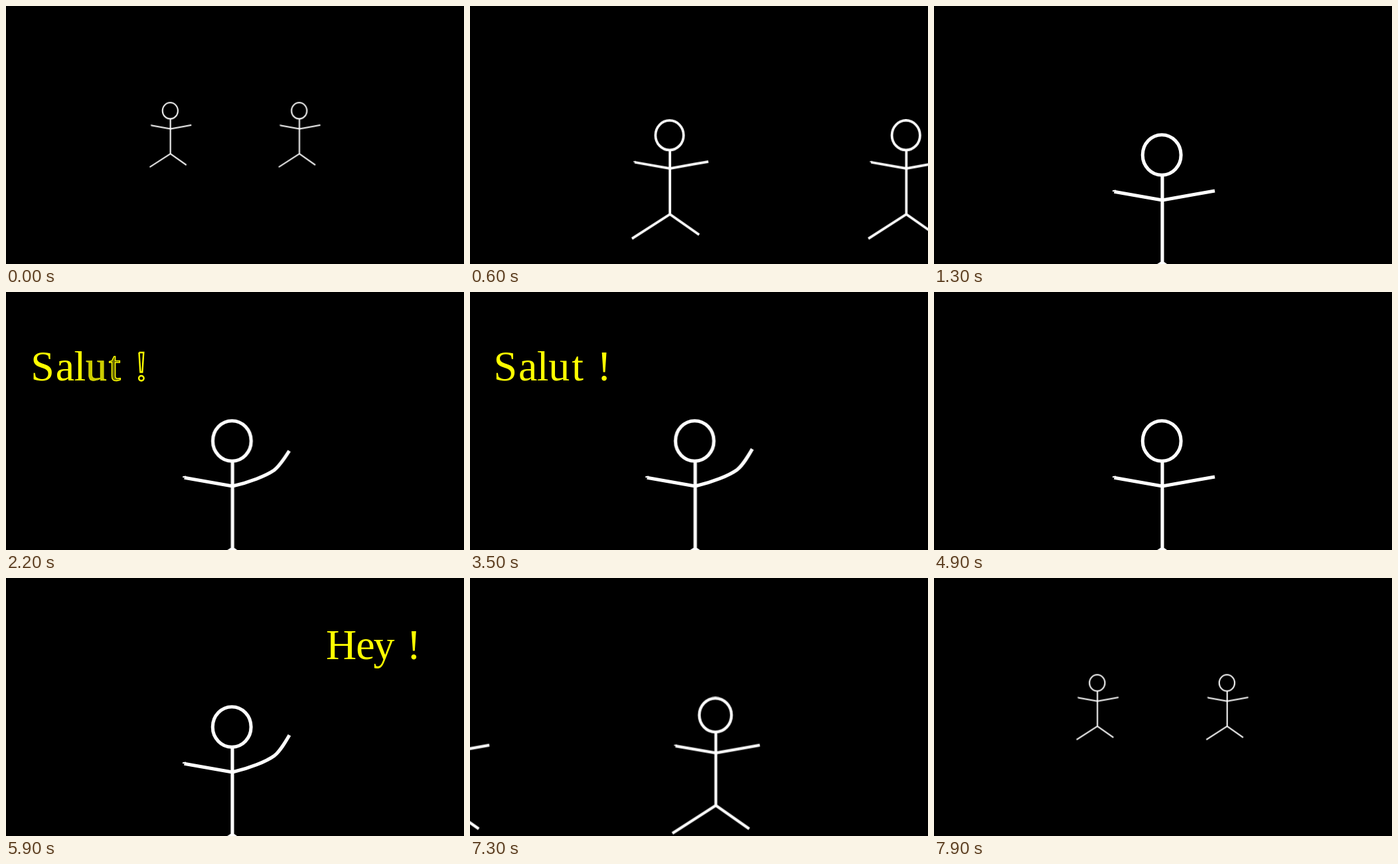
An HTML page without scripts for the animation above (8 s loop, 690 px wide and 388 px high).

```html
<!DOCTYPE html>
<html lang="fr">
<head>
<meta charset="utf-8">
<title>Two figures greeting</title>
<style>
  /* Camera: w is the view width relative to the close-up, x and y its centre */
  @property --w { syntax: "<number>"; inherits: true; initial-value: 2.5; }
  @property --x { syntax: "<number>"; inherits: true; initial-value: 587.25; }
  @property --y { syntax: "<number>"; inherits: true; initial-value: 315.25; }

  :root {
    --smooth: linear(0, .0044, .0115, .0229, .0413, .0701, .114, .1781, .2658, .3759, .5,
      .6241, .7342, .8219, .886, .9299, .9587, .9771, .9885, .9956, 1);
    --rest: path("M344 292C364 288.4 380 285.5 393 283.3C404 281.4 414 279.6 423 278");
    --raised: path("M344 292C370 286 395 276 407.5 267C416 260 423 248 430 236");
  }
  html, body { margin: 0; width: 100%; height: 100%; overflow: hidden; background: #000; }
  svg { display: block; width: 100%; height: 100%; }

  .camera, .pose, .arm, .text { animation: 8s var(--smooth) infinite both; }
  .camera {
    transform: translate(345px, 194px) scale(calc(1 / var(--w)))
      translate(calc(var(--x) * -1px), calc(var(--y) * -1px));
    animation-name: camera;
  }
  @keyframes camera {
    0%, 99.875%, 100% { --w: 2.5; --x: 587.25; --y: 315.25; }
    12.25%, 43.25% { --w: 1; --x: 345; --y: 194; }
    55.75%, 87.375% { --w: 1; --x: 830.75; --y: 194; }
  }

  .figure { fill: none; stroke: #fff; stroke-width: 5.1; }
  .arm { d: var(--rest); }
  .first .pose { animation-name: lean1; }
  .first .arm { animation-name: wave1; }
  .second .pose { animation-name: lean2; }
  .second .arm { animation-name: wave2; }
  @keyframes lean1 {
    0%, 18.125%, 55.75%, 100% { transform: translate(0, 0); }
    30.625%, 43.25% { transform: translate(-3px, 0); }
  }
  @keyframes lean2 {
    0%, 61.875%, 86.875%, 100% { transform: translate(0, 0); }
    74.375% { transform: translate(-3px, 0); }
  }
  @keyframes wave1 {
    0%, 18.125%, 55.75%, 100% { d: var(--rest); }
    30.625%, 43.25% { d: var(--raised); }
  }
  @keyframes wave2 {
    0%, 61.875%, 86.875%, 100% { d: var(--rest); }
    74.375% { d: var(--raised); }
  }

  .text {
    font: 64px "Liberation Serif", serif;
    text-anchor: middle;
    fill: #ff0;
    stroke: #ff0;
  }
  .salut { --len: 260; --start: 1.45s; --lag: .1s; animation-name: fade1; }
  .hey { --len: 420; --start: 4.95s; --lag: .14s; animation-name: fade2; }
  @keyframes fade1 {
    0%, 43.25% { opacity: 1; }
    55.75%, 100% { opacity: 0; }
  }
  @keyframes fade2 {
    0%, 30% { opacity: 0; }
    30.01%, 74.375% { opacity: 1; }
    86.875%, 100% { opacity: 0; }
  }

  /* Each letter is outlined, then filled */
  .text text {
    stroke-dasharray: var(--len);
    animation: write 8s linear calc(var(--start) + var(--i, 0) * var(--lag)) infinite both;
  }
  .text text:nth-child(2) { --i: 1; }
  .text text:nth-child(3) { --i: 2; }
  .text text:nth-child(4) { --i: 3; }
  .text text:nth-child(5) { --i: 4; }
  .text text:nth-child(6) { --i: 5; }
  @keyframes write {
    0% { stroke-dashoffset: var(--len); stroke-width: 2.4px; fill-opacity: 0; }
    3.125% { stroke-dashoffset: 0; stroke-width: 2.4px; fill-opacity: 0; }
    6.25%, 38.5% { stroke-dashoffset: 0; stroke-width: 0px; fill-opacity: 1; }
    38.51%, 100% { stroke-dashoffset: var(--len); stroke-width: 0px; fill-opacity: 0; }
  }
</style>
</head>
<body>
<svg viewBox="0 0 690 388">
  <defs>
    <g id="body">
      <ellipse cx="343.2" cy="224" rx="28.9" ry="30.3"/>
      <path d="M344 254.500V386M266 436L344 386L404 428M271.500 279.300L344 292"/>
      <path d="M269 278.300L274 277.600" stroke-width="2"/>
    </g>
  </defs>
  <g class="camera">
    <g class="figure first">
      <g class="pose"><use href="#body"/><path class="arm"/></g>
    </g>
    <g class="figure second" transform="translate(485.75 0)">
      <g class="pose"><use href="#body"/><path class="arm"/></g>
    </g>
    <g class="text salut">
      <text x="55" y="132.500">S</text>
      <text x="89" y="132.500">a</text>
      <text x="111.500" y="132.500">l</text>
      <text x="136" y="132.500">u</text>
      <text x="164" y="132.500">t</text>
      <text x="204" y="132.500">!</text>
    </g>
    <g class="text hey" transform="translate(485.75 0)">
      <text x="505" y="122">H</text>
      <text x="541.500" y="122">e</text>
      <text x="569.500" y="122">y</text>
      <text x="614.500" y="122">!</text>
    </g>
  </g>
</svg>
</body>
</html>
```
